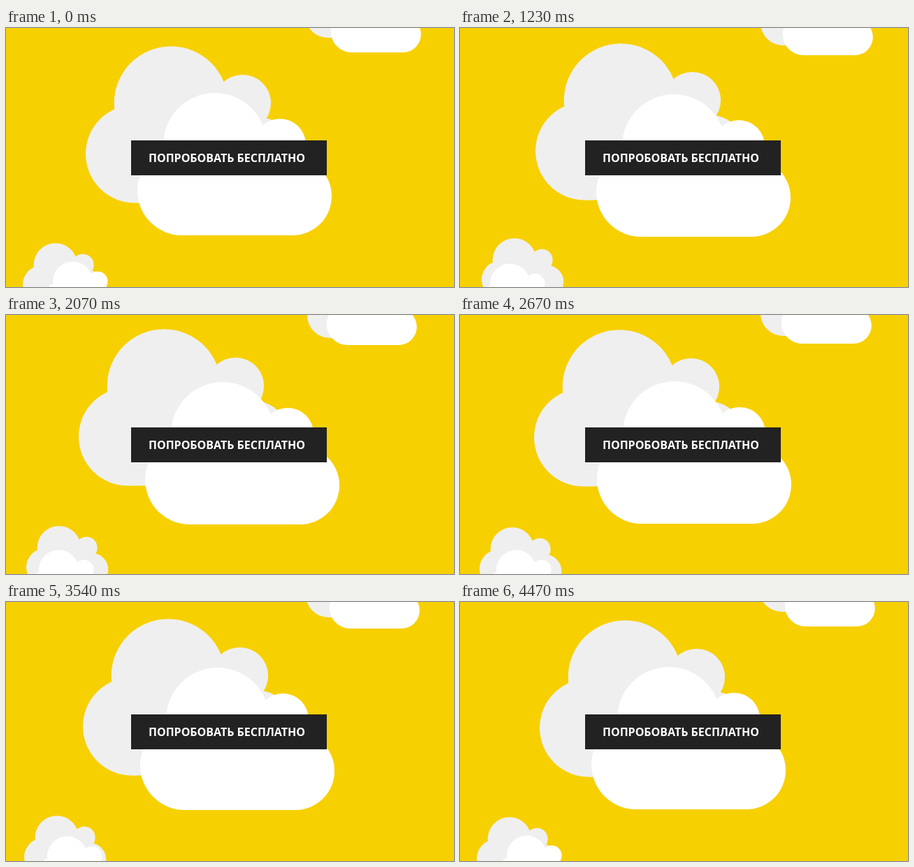
Write an HTML page that moves like this. It is 641 by 371 pixels and loops after 4.5 s.

```html
<!DOCTYPE html>
<html lang="ru">
<head>
<meta charset="utf-8">
<style>
html, body { margin: 0; width: 100%; height: 100%; overflow: hidden; background: #f7d002; }
svg { display: block; }
text { font: 700 16px "Open Sans", "Noto Sans", sans-serif; fill: #fff; }
</style>
</head>
<body>
<svg width="641" height="371" viewBox="0 0 641 371">
  <defs>
    <g id="cloud">
      <circle cx="111" cy="74" r="74"/>
      <circle cx="204" cy="74" r="37"/>
      <circle cx="64" cy="140" r="64"/>
      <circle cx="222" cy="148" r="56"/>
      <path d="M64 100H222V204H64Z"/>
    </g>
  </defs>
  <g id="sky"></g>
  <path d="M179 161H459V211H179Z" fill="#222"/>
  <text x="204" y="192">ПОПРОБОВАТЬ БЕСПЛАТНО</text>
</svg>
<script>
const LOOP = 4500, GRAY = '#efefef', WHITE = '#fff';

// x, y: rest position; dx, dy: farthest drift, reached at peak ms
const clouds = [
  { x: 114, y: 26.2, scale: 1.1, fill: GRAY, dx: -10.15, dy: -6.1, peak: 2090 },
  { x: 188, y: 93, scale: 1, fill: WHITE, dx: 11.15, dy: 3, peak: 2090 },
  { x: 24, y: 308.2, scale: 0.4216, fill: GRAY, dx: 7.1, dy: -7.2, peak: 1332 },
  { x: 52.8, y: 334.5, scale: 0.385, fill: WHITE, dx: -25.8, dy: 3, peak: 1332 },
  { x: 428, y: -90, scale: 0.51, fill: GRAY, dx: 3, dy: 20, peak: 2200 },
  { x: 464.8, y: -59.6, scale: 0.464, fill: WHITE, dx: -5.95, dy: 8, peak: 2200 }
];

const sky = document.getElementById('sky');
for (const c of clouds) {
  c.node = document.createElementNS('http://www.w3.org/2000/svg', 'use');
  c.node.setAttribute('href', '#cloud');
  c.node.setAttribute('fill', c.fill);
  sky.append(c.node);
}

function draw(now) {
  const t = now % LOOP;
  for (const c of clouds) {
    const p = t < c.peak ? t / c.peak : (LOOP - t) / (LOOP - c.peak);
    // drift in whole pixels
    const x = c.x + Math.round(c.dx * p), y = c.y + Math.round(c.dy * p);
    c.node.setAttribute('transform', `translate(${x} ${y}) scale(${c.scale})`);
  }
}

const start = performance.now();
function tick() {
  draw(performance.now() - start);
  requestAnimationFrame(tick);
}
tick();
</script>
</body>
</html>
```
